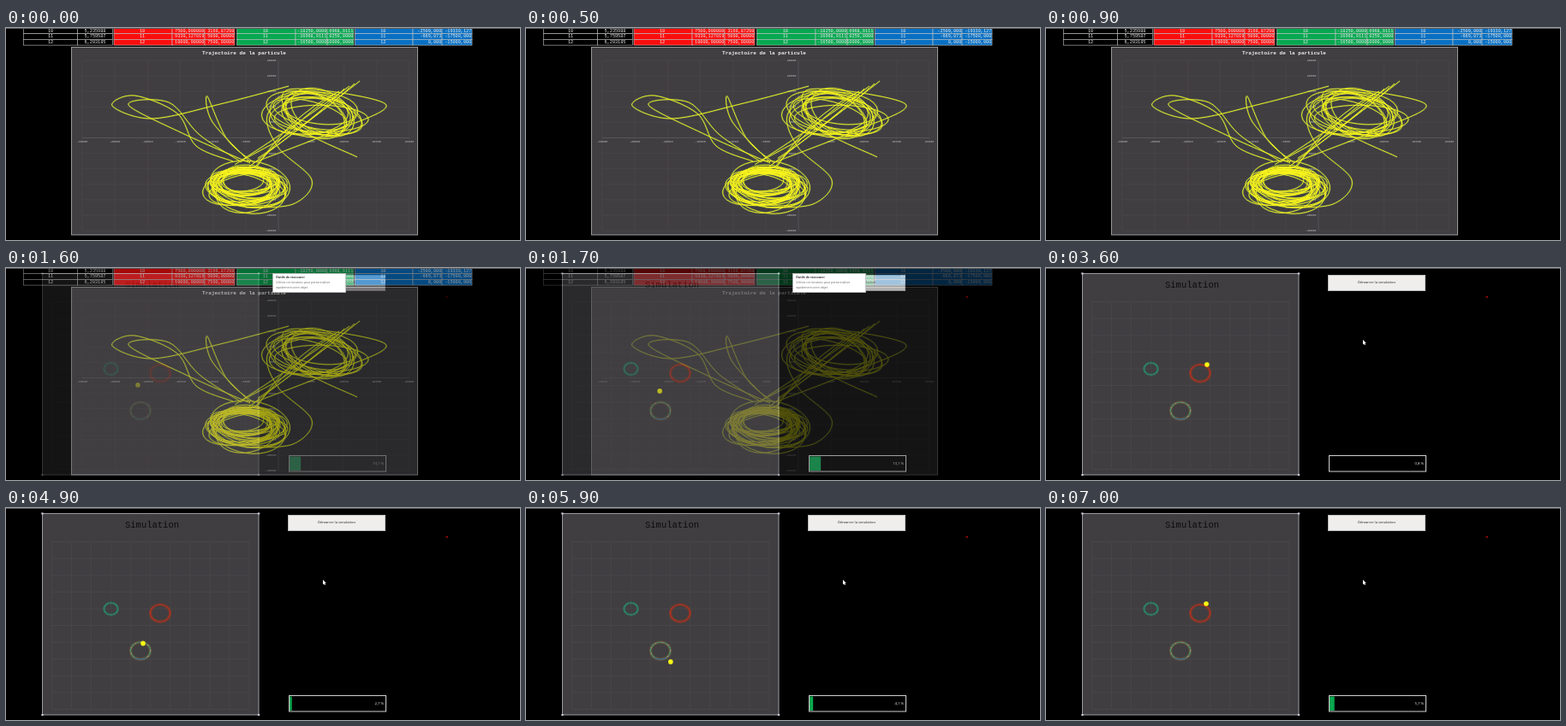
Animation, 600 px wide and 248 px high, one loop 7100 ms. Source, as an HTML page with a canvas:

```html
<!DOCTYPE html>
<html lang="fr">
<head>
<meta charset="utf-8">
<style>
html, body { margin: 0; width: 100%; height: 100%; overflow: hidden; background: #000; }
canvas { display: block; width: 600px; height: 248px; }
</style>
</head>
<body>
<canvas id="stage" width="600" height="248"></canvas>
<script>
const LOOP = 7100, STEP = 100, W = 600, H = 248, TAU = 2 * Math.PI;
const CUT = 1600, RESTART = 3100;
const MONO = '"Liberation Mono", monospace';
const SANS = '"Open Sans", sans-serif';
const view = document.getElementById('stage').getContext('2d');
let g = view;

const clamp = v => Math.max(0, Math.min(1, v));
const lerp = (a, b, s) => a + (b - a) * s;
const smooth = s => s * s * (3 - 2 * s);
const num = (v, d) => v.toFixed(d).replace('.', ',');

let seed = 11;
function rand(lo, hi) {
  seed = (seed * 16807) % 2147483647;
  return lerp(lo, hi, seed / 2147483647);
}

function box(x, y, w, h, fill, stroke, lw = 1) {
  if (fill) { g.fillStyle = fill; g.fillRect(x, y, w, h); }
  if (stroke) { g.strokeStyle = stroke; g.lineWidth = lw; g.strokeRect(x, y, w, h); }
}

function line(x1, y1, x2, y2, color, lw = 1) {
  g.strokeStyle = color;
  g.lineWidth = lw;
  g.beginPath();
  g.moveTo(x1, y1);
  g.lineTo(x2, y2);
  g.stroke();
}

function text(s, x, y, font, color, align = 'left') {
  g.font = font;
  g.fillStyle = color;
  g.textAlign = align;
  g.textBaseline = 'middle';
  g.fillText(s, x, y);
}

function disc(x, y, r, color) {
  g.fillStyle = color;
  g.beginPath();
  g.arc(x, y, r, 0, TAU);
  g.fill();
}

// Smooth curve through flat x,y pairs
function spline(path, ...p) {
  const n = p.length / 2;
  const at = i => { i = Math.max(0, Math.min(n - 1, i)); return [p[2 * i], p[2 * i + 1]]; };
  path.moveTo(p[0], p[1]);
  for (let i = 0; i < n - 1; i++) {
    const [a, b, c, d] = [at(i - 1), at(i), at(i + 1), at(i + 2)];
    path.bezierCurveTo(b[0] + (c[0] - a[0]) / 6, b[1] + (c[1] - a[1]) / 6,
      c[0] - (d[0] - b[0]) / 6, c[1] - (d[1] - b[1]) / 6, c[0], c[1]);
  }
}

// Scattered orbits around one centre
function swarm(path, n, cx, cy, spread, rx, ry, rot) {
  for (let i = 0; i < n; i++) {
    const orbit = new Path2D();
    orbit.ellipse(cx + rand(-spread, spread), cy + rand(-spread, spread) * 0.7,
      rand(...rx), rand(...ry), rand(...rot), 0, TAU);
    path.addPath(orbit);
  }
}

function buildTrajectory() {
  const path = new Path2D();
  swarm(path, 19, 280, 186, 6, [32, 47], [14, 27], [-0.25, 0.25]);
  swarm(path, 9, 279, 181, 3, [24, 47], [8, 15], [-0.12, 0.12]);
  swarm(path, 12, 362, 100, 9, [36, 57], [12, 27], [-0.1, 0.6]);
  for (let i = 0; i < 6; i++) {
    path.moveTo(rand(262, 300), rand(152, 166));
    path.quadraticCurveTo(rand(325, 355), rand(98, 126), 413 - 6 * i, 62 + 3 * i);
  }
  spline(path, 265, 156, 222, 138, 200, 100, 150, 79, 124, 91, 170, 106, 250, 89, 330, 68);
  spline(path, 285, 158, 210, 125, 143, 90, 190, 87, 226, 125, 275, 157);
  spline(path, 290, 158, 258, 130, 235, 80, 241, 110, 285, 157);
  spline(path, 410, 151, 340, 115, 330, 72, 443, 89, 380, 122, 290, 157);
  spline(path, 280, 210, 335, 206, 357, 178, 318, 140, 305, 102, 335, 75);
  return path;
}

function drawTable() {
  const font = '5.2px ' + MONO, edge = '#c4c4c4', rowH = 6.7;
  const groups = [
    { x: [126, 194, 232, 267], color: '#fb0d0d', cx: 5000, cy: 7500, r: 5000, dx: 6, dy: 5 },
    { x: [269.5, 338, 375, 406], color: '#06a850', cx: -20000, cy: 10000, r: 3500, dx: 4, dy: 4 },
    { x: [407.5, 475, 509, 544], color: '#0870c4', cx: -5000, cy: -15000, r: 5000, dx: 3, dy: 3 }
  ];
  for (let i = 10; i <= 12; i++) {
    const y = (i - 10) * rowH, mid = y + 3.4, a = i * TAU / 12;
    box(20.5, y, 63, rowH, '#000', edge, 0.6);
    box(83.5, y, 41, rowH, '#000', edge, 0.6);
    text(i, 52, mid, font, '#eee', 'center');
    text(num(a, 6), 104, mid, font, '#eee', 'center');
    for (const { x, color, cx, cy, r, dx, dy } of groups) {
      for (let k = 0; k < 3; k++) box(x[k], y, x[k + 1] - x[k], rowH, color, edge, 0.6);
      text(i, (x[0] + x[1]) / 2 - 1, mid, font, '#eee', 'center');
      text(num(cx + r * Math.cos(a), dx).slice(0, 11), x[2] - 0.7, mid, font, '#eee', 'right');
      text(num(cy + r * Math.sin(a), dy).slice(0, 10), x[3] - 0.7, mid, font, '#eee', 'right');
    }
  }
}

function drawChart() {
  box(0, 0, W, H, '#000');
  drawTable();
  box(0, 0, W, 1, '#5a5a5a');
  box(76.5, 22.5, 404, 219.5, '#403e41', '#98989a');
  const label = '3.6px ' + MONO, ink = '#bdbdbd';
  const X = u => 318 + u * 38.2, Y = u => 128.5 - u * 18.1;
  const tone = u => u ? '#49474a' : '#5c5a5e';
  for (let u = -6; u <= 4; u++) {
    line(X(u), Y(5), X(u), Y(-6), tone(u), 0.8);
    text(u * 5000, X(u), 133.5, label, ink, 'center');
  }
  for (let u = -6; u <= 5; u++) {
    line(X(-6), Y(u), X(4), Y(u), tone(u), 0.8);
    if (u) text(u * 5000, 315.5, Y(u), label, ink, 'right');
  }
  text('Trajectoire de la particule', 278, 29, 'bold 6.05px ' + MONO, '#f0f0f0', 'center');
  const path = buildTrajectory();
  g.strokeStyle = 'rgba(110,180,110,.25)';
  g.lineWidth = 2.2;
  g.stroke(path);
  g.strokeStyle = '#f8f41c';
  g.lineWidth = 0.95;
  g.stroke(path);
}

const chart = document.createElement('canvas');
chart.width = W;
chart.height = H;
g = chart.getContext('2d');
drawChart();
g = view;

// Swing around the lower ring, one unit per revolution
const orbit = u => [160 - 12.5 * Math.sin(Math.PI * u), 156 + 24 * Math.sin(TAU * u + 0.1)];
const between = (a, b, s) => [lerp(a[0], b[0], s), lerp(a[1], b[1], s)];

function particle(t) {
  if (t < RESTART) return orbit(0.9 + (Math.min(t, 2500) - 1700) / 1600);
  const u = (t - 4900) / 800;
  if (t < 4300) return between([192, 99], orbit(-0.75), ((t - RESTART) / 1200) ** 2);
  if (t < 6300) return orbit(u);
  return between(orbit(1.75), [187, 112], ((t - 6300) / 700) ** 3);
}

function progress(t) {
  return t < RESTART
    ? 13.1 + 0.2 * clamp((t - 1700) / 800)
    : Math.max(0, 2.7 + (t - 4900) / 700);
}

function ring(x, y, rx, ry, halo, color) {
  g.lineWidth = 3.6;
  g.strokeStyle = halo;
  g.beginPath();
  g.ellipse(x, y, rx, ry, 0, 0, TAU);
  g.stroke();
  for (let i = 0; i < 36; i++) {
    const a = i / 36 * TAU;
    disc(x + rx * Math.cos(a), y + ry * Math.sin(a), 0.7, color(i));
  }
}

function drawPlot(t) {
  box(42.5, 6.5, 252.5, 235.5, '#403e41', '#9b9b9f');
  for (const x of [42.5, 295]) for (const y of [6.5, 242]) disc(x, y, 1.3, '#c8c8d8');
  for (let i = 0; i <= 10; i++) {
    const x = 53.5 + i * 23.05, y = 39.5 + i * 19.6;
    line(x, 39.5, x, 235.5, '#4a484b', 0.8);
    line(53.5, y, 284, y, '#4a484b', 0.8);
  }
  text('Simulation', 170.5, 20, '10.5px ' + MONO, '#0c0c0c', 'center');
  ring(122.5, 118, 8, 7, 'rgba(40,130,95,.3)', () => '#2b9b78');
  ring(180, 123, 11.5, 10, 'rgba(170,55,25,.38)', () => '#e22a12');
  ring(157, 167, 11.5, 10, 'rgba(120,95,55,.5)', i =>
    i > 5 && i < 13 ? '#2390d8' : i % 4 ? '#3fb58c' : '#c9b49a');
  disc(...particle(t), 2.8, '#f8f814');
}

function drawProgress(t) {
  const p = progress(t);
  box(330.5, 219.5, 113, 18.5, '#000', '#d0d0d0');
  if (p > 1) box(331, 220.5, p, 16.5, '#08a850');
  text(num(p, 1) + ' %', 441, 229, '4.3px ' + SANS, '#fff', 'right');
}

function drawButton() {
  box(329.5, 8.5, 113, 18, '#efeeec', '#bcbcbc');
  text('Démarrer la simulation', 386, 17.3, '4.1px ' + SANS, '#222', 'center');
}

function drawTip() {
  box(311.5, 6.5, 85, 22, '#fff', '#bbb', 0.8);
  text('Outils de raccourci', 315, 11, 'bold 3.6px ' + SANS, '#333');
  text('Utilisez ces boutons pour personnaliser', 315, 17.5, '3.45px ' + SANS, '#666');
  text('rapidement votre objet.', 315, 22.8, '3.45px ' + SANS, '#666');
}

function drawTools() {
  for (let i = 0; i < 3; i++) box(299.5, 6.5 + 12 * i, 9, 9, '#f6f6f6', '#999', 0.8);
  line(301, 11, 307, 11, '#555', 1.2);
  line(304, 8, 304, 14, '#555', 1.2);
  line(303.5, 23.5, 306.5, 20.5, '#555', 1.2);
  disc(302.6, 24.6, 1.2, '#555');
  g.fillStyle = '#444';
  g.fill(new Path2D('M301 32h6l-2.2 3v3.5l-1.6-1v-2.5z'));
}

const arrow = new Path2D('M0 0v5.4l1.2-1 .8 1.8 .9-.4-.8-1.8 1.6-.1z');

// Goes up to the button, then back down
function drawPointer(t) {
  const up = smooth(clamp((t - 2500) / 400)), down = smooth(clamp((t - RESTART) / 300));
  const [x, y] = between(between([398, 65], [386, 18], up), [370, 84], down);
  g.save();
  g.translate(x, y);
  g.strokeStyle = '#333';
  g.lineWidth = 0.6;
  g.stroke(arrow);
  g.fillStyle = '#fff';
  g.fill(arrow);
  g.restore();
}

function draw(t) {
  if (t < CUT) {
    g.drawImage(chart, 0, 0);
    return;
  }
  box(0, 0, W, H, '#000');
  box(0, 0, W, 1, '#5a5a5a');
  drawPlot(t);
  drawButton();
  drawProgress(t);
  box(513.5, 33.2, 2.4, 1.4, '#c01010');
  g.globalAlpha = clamp((1800 - t) / 300);
  g.drawImage(chart, 0, 0);
  g.globalAlpha = 1;
  if (t < 2900) drawTip();
  if (t >= 1800) {
    if (t < 2900) drawTools();
    drawPointer(t);
  }
}

const start = performance.now();
function tick() {
  const t = (performance.now() - start) % LOOP;
  draw(Math.floor(t / STEP) * STEP);
  requestAnimationFrame(tick);
}
tick();
</script>
</body>
</html>
```
